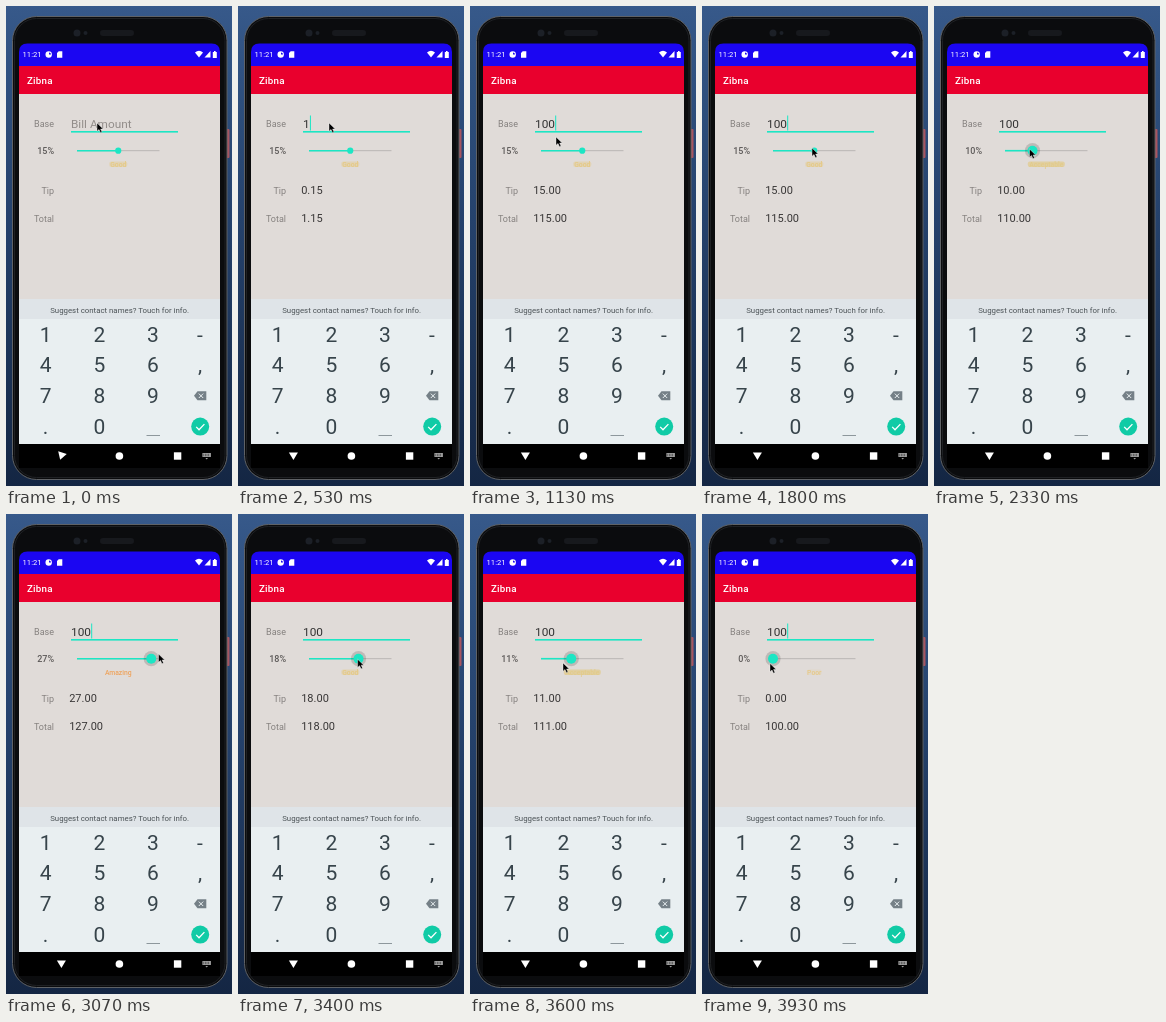
An HTML page for the animation above (3990 ms loop, 226 px wide and 480 px high).

```html
<!DOCTYPE html>
<html lang="en">
<head>
<meta charset="utf-8">
<title>Tip calculator</title>
<style>
  html, body { margin: 0; height: 100%; overflow: hidden; background: #1d3658; }
  svg { display: block; width: 100vw; height: 100vh; }
  text { font-family: Roboto, sans-serif; }
  .label { font-size: 9px; fill: #85817f; text-anchor: end; }
  .value { font-size: 11px; fill: #383636; }
  .field { font-size: 11.8px; }
  .key { font-size: 21px; fill: #37444b; text-anchor: middle; }
  #percent { font-weight: 500; fill: #5c5958; }
  #mood { font-size: 6.8px; font-weight: 500; text-anchor: middle; }
</style>
</head>
<body>
<svg viewBox="0 0 226 480">
  <defs>
    <linearGradient id="desk" x2="0" y2="1">
      <stop offset="0" stop-color="#37598a"/>
      <stop offset=".15" stop-color="#2f5180"/>
      <stop offset=".5" stop-color="#233f68"/>
      <stop offset="1" stop-color="#142643"/>
    </linearGradient>
  </defs>
  <rect width="226" height="480" fill="url(#desk)"/>

  <!-- phone body -->
  <rect x="220" y="123" width="3.5" height="29" rx="1" fill="#a85560"/>
  <rect x="6.500" y="10.500" width="214.500" height="463" rx="24" fill="#0b0c0e" stroke="#5f6266"/>
  <rect x="8.500" y="12.500" width="210.500" height="459" rx="22" fill="none" stroke="#1f2124"/>
  <rect x="94" y="24" width="34" height="6" rx="3" fill="#17191d"/>
  <circle cx="71" cy="27" r="3.500" fill="#1c2027"/>
  <circle cx="79.500" cy="27" r="2" fill="#1c2027"/>

  <!-- status bar -->
  <path d="M13 60V46Q13 37.500 21.500 37.500H205.500Q214 37.500 214 46V60Z" fill="#1b06f2"/>
  <g fill="#fff">
    <text x="16.600" y="51" font-size="7.600">11:21</text>
    <circle cx="42.700" cy="48.500" r="3.200"/>
    <path d="M43 48.500V46.500A2 2 0 0 1 45 48.500Z" fill="#1b06f2"/>
    <path d="M51 47l1.700-1.800h3.600v6.600H51z"/>
    <path d="M189 46.500Q193 43 197 46.500L193 51.500Z"/>
    <path d="M198.500 51.500L204.500 45v6.500z"/>
    <path d="M206.800 46h1.200v-1h1.600v1h1.200v6h-4z"/>
  </g>

  <!-- app -->
  <rect x="13" y="60" width="201" height="28" fill="#e9002d"/>
  <text x="21" y="77.500" font-size="9.800" font-weight="500" letter-spacing=".2" fill="#fff">Zibna</text>
  <rect x="13" y="88" width="201" height="206" fill="#e0dbd8"/>
  <text class="label" x="48" y="121">Base</text>
  <text class="label" x="48" y="148.300" id="percent"></text>
  <text class="label" x="48" y="187.500">Tip</text>
  <text class="label" x="48" y="215.500">Total</text>
  <text class="field" x="65" y="121.500" id="base"></text>
  <rect id="caret" y="109.500" width="1" height="15" fill="#1ce6c4"/>
  <rect x="65" y="125" width="107" height="1.600" fill="#1ce6c4"/>
  <text class="value" x="63.200" y="188.200" id="tip"></text>
  <text class="value" x="63.200" y="216" id="total"></text>

  <g transform="translate(71 144.700)">
    <path d="M0 0H82.500" stroke="#b9b6b3"/>
    <path id="fill" stroke="#1ce6c4" stroke-width="1.600"/>
    <circle id="halo" r="7.600" fill="#000" opacity=".15"/>
    <circle id="thumb" fill="#1ce6c4"/>
  </g>
  <rect id="band" y="155.500" height="5.500" rx="2"/>
  <text id="mood" x="112.300" y="160.500"></text>

  <!-- keyboard -->
  <rect x="13" y="293" width="201" height="145" fill="#e9eff1"/>
  <rect x="13" y="293" width="201" height="20" fill="#dfe4e8"/>
  <text x="113.600" y="306.500" font-size="7.850" text-anchor="middle" fill="#4b5256">Suggest contact names? Touch for info.</text>
  <g id="keys"></g>
  <path d="M140.500 429.500H154" stroke="#8d979c"/>
  <path d="M188 389.800l3.500-4.500h8.800v9h-8.800z" fill="#758087"/>
  <path d="M192.800 387.600l4.400 4.400m0-4.400l-4.400 4.400" stroke="#e9eff1"/>
  <circle cx="194.200" cy="420.600" r="9" fill="#10cba6"/>
  <path d="M190.200 420.900l2.800 2.800 5.400-5.600" fill="none" stroke="#fff" stroke-width="1.300"/>

  <!-- navigation bar -->
  <rect x="13" y="438" width="201" height="24" fill="#000"/>
  <g fill="#fff" transform="translate(.4 0)">
    <path id="back" d="M50.500 446.500H59.500L55 454Z"/>
    <circle cx="113" cy="450" r="3.800"/>
    <rect x="167.500" y="446.300" width="7.400" height="7.400"/>
    <path d="M196 447h8.500v4H196zm3 5h2.600l-1.300 1.400z" fill="#a0a0a0"/>
    <path d="M197 448.300h6.500m-6.500 1.400h6.500" stroke="#000" stroke-width=".6" stroke-dasharray=".8"/>
  </g>

  <path id="mouse" d="M0 0V8.300L2 6.500 3.500 9.700 5 9 3.600 6H6.200Z" fill="#000" stroke="#fff" stroke-width=".4"/>
</svg>
<script>
const $ = id => document.getElementById(id);
const LOOP = 3990;

// keyed by video tick (1/15 s)
const mousePath = [[0, 91, 117], [16, 91, 117], [17, 86, 131], [24, 108, 141], [25, 108, 141],
  [27, 110, 142], [31, 110, 142], [39, 81, 144], [41, 78, 144], [42, 80, 144], [46, 152.5, 140],
  [47, 155, 140], [54, 93, 149], [55, 86, 149], [59, 68, 149.5]];
const percentPath = [[0, 15], [31, 15], [39, 5], [41, 4], [42, 3], [46, 27], [47, 28],
  [54, 11], [55, 8], [59, 0]];

// lowest percent, word, colour, width and strength of the highlight
const moods = [[25, "Amazing", "#eea35c", 28, 0], [20, "Great", "#eab474", 19, .2],
  [15, "Good", "#e5c983", 18, .4], [10, "Acceptable", "#e2cb8a", 37, .7], [0, "Poor", "#e7c988", 15, .15]];

[["1", "2", "3", "-"], ["4", "5", "6", ","], ["7", "8", "9"], [".", "0"]].forEach((row, r) =>
  row.forEach((key, c) => {
    $("keys").innerHTML += `<text class="key" x="${[39.6, 93.3, 147, 194][c]}" y="${335.6 + r * 30.7}">${key}</text>`;
  }));

function along(path, k) {
  const i = path.findIndex(p => p[0] >= k);
  const b = path[i], a = path[Math.max(0, i - 1)];
  const u = b[0] > a[0] ? (k - a[0]) / (b[0] - a[0]) : 0;
  return a.slice(1).map((v, n) => v + (b[n + 1] - v) * u);
}

function set(id, attrs) {
  for (const name in attrs) $(id).setAttribute(name, attrs[name]);
}

function draw(t) {
  const part = t % 200;
  const k = 3 * Math.floor(t / 200) + (part >= 70) + (part >= 130);

  const typed = "100".slice(0, k < 7 ? 0 : k < 9 ? 1 : k < 11 ? 2 : 3);
  $("base").textContent = typed || "Bill Amount";
  set("base", { fill: typed ? "#333" : "#928d8a" });
  const caretOn = typed && (t < 730 || Math.floor((t - 730) / 500) % 2 === 0);
  set("caret", { x: 65.3 + typed.length * 6.63, opacity: caretOn ? 1 : 0 });

  const percent = Math.round(along(percentPath, k)[0]);
  const tip = typed * percent / 100;
  $("percent").textContent = percent + "%";
  $("tip").textContent = typed && tip.toFixed(2);
  $("total").textContent = typed && (+typed + tip).toFixed(2);

  const x = percent * 82.5 / 30;
  const dragging = k >= 32;
  set("fill", { d: `M0 0H${x}` });
  set("thumb", { cx: x, r: dragging ? 5 : 3.1 });
  set("halo", { cx: x, visibility: dragging ? "visible" : "hidden" });

  const [, word, fill, width, opacity] = moods.find(m => percent >= m[0]);
  $("mood").textContent = word;
  set("mood", { fill });
  set("band", { x: 112.3 - width / 2, width, fill, opacity });

  set("back", { transform: `rotate(${[18, 7][k] || 0} 55 450)` });
  set("mouse", { transform: `translate(${along(mousePath, k)})` });
}

function frame(now) {
  draw(now % LOOP);
  requestAnimationFrame(frame);
}
draw(0);
requestAnimationFrame(frame);
</script>
</body>
</html>
```
